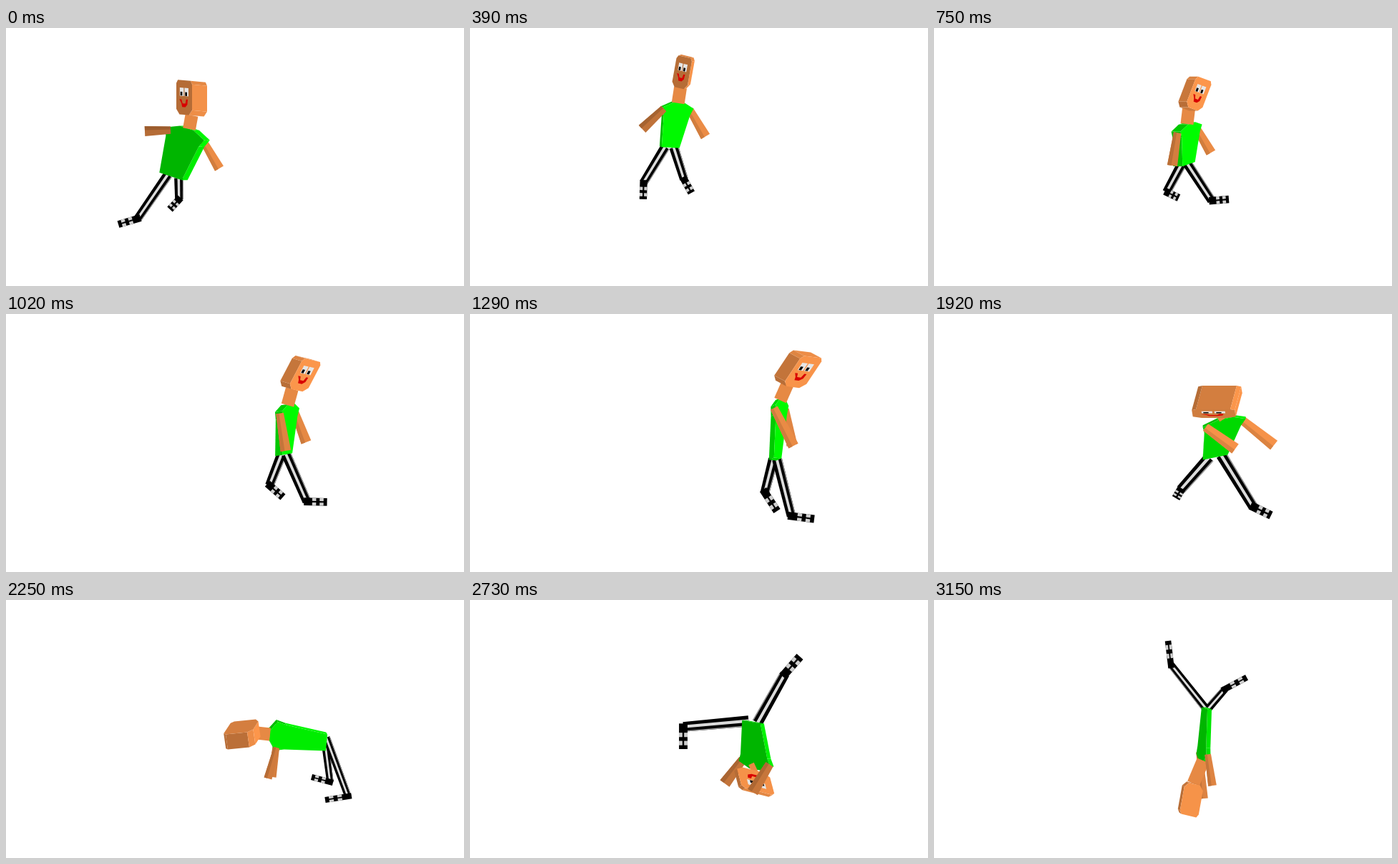
Recreate the animation shown at these times as an HTML page with a canvas. Size 640 by 360 pixels, loop 3180 ms.

```html
<!DOCTYPE html>
<html>
<head>
<meta charset="utf-8">
<style>
html, body { margin: 0; width: 100%; height: 100%; overflow: hidden; background: #fff; }
canvas { display: block; }
</style>
</head>
<body>
<canvas id="stage" width="640" height="360"></canvas>
<script>
const ctx = document.getElementById('stage').getContext('2d');
const LOOP = 3180, STEP = 30;
const SKIN = [255, 152, 76], GREEN = [0, 255, 0], GREY = [230, 230, 230], RED = [216, 0, 0];

// Key poses: joints on the stage, plus the half shoulder line, the chest depth
// and the three axes of the head (right, down, back) as projected vectors.
const poses = [
  { t: 0, girth: .92, hop: 32, neck: [252,141], hip: [230,207], shoulder: [27,9], depth: [8,0],
    handL: [194,144], handR: [298,196], ankleA: [184,266], toeA: [157,274], ankleB: [242,239], toeB: [229,253],
    head: [249,97], right: [11,1], down: [0,24], back: [21,2] },
  { t: 750, girth: .95, hop: 0, neck: [360,134], hip: [356,190], shoulder: [15,-5], depth: [-13,0],
    handL: [333,192], handR: [387,174], ankleA: [325,229], toeA: [342,237], ankleB: [388,241], toeB: [412,239],
    head: [370,92], right: [11,4], down: [-8,21], back: [-12,0] },
  { t: 1290, girth: 1, hop: 0, neck: [437,119], hip: [430,201], shoulder: [9,1], depth: [-7,3],
    handL: [452,184], handR: [450,183], ankleA: [412,249], toeA: [429,275], ankleB: [449,282], toeB: [481,286],
    head: [465,81], right: [15,2], down: [-14,21], back: [-15,-8] },
  { t: 1920, girth: 1.08, hop: 0, neck: [407,147], hip: [393,200], shoulder: [30,-6], depth: [0,-3],
    handL: [421,188], handR: [475,183], ankleA: [345,245], toeA: [338,257], ankleB: [446,269], toeB: [471,281],
    head: [391,139], right: [30,0], down: [1,6], back: [9,-33] },
  { t: 2250, girth: .75, hop: 0, neck: [370,189], hip: [448,199], shoulder: [2,-20], depth: [-2,-3],
    handL: [366,249], handR: [372,247], ankleA: [453,254], toeA: [427,247], ankleB: [478,274], toeB: [446,279],
    head: [332,198], right: [-6,9], down: [20,-2], back: [-3,-21] },
  { t: 2730, girth: 1.08, hop: 0, neck: [398,235], hip: [393,170], shoulder: [-22,-4], depth: [5,0],
    handL: [395,268], handR: [356,256], ankleA: [440,103], toeA: [461,79], ankleB: [298,177], toeB: [298,208],
    head: [399,252], right: [-23,-6], down: [-4,-15], back: [-4,3] },
  { t: 3150, girth: .78, hop: 0, neck: [373,224], hip: [378,151], shoulder: [-7,-2], depth: [6,0],
    handL: [389,259], handR: [377,277], ankleA: [407,124], toeA: [437,108], ankleB: [331,90], toeB: [327,57],
    head: [357,277], right: [13,3], down: [4,-22], back: [3,2] }
];

// Outlines in units of the two front axes.
const HEAD = [[-.8,-1], [.8,-1], [1,-.8], [1,.7], [.6,1], [-.6,1], [-1,.7], [-1,-.8]];
const SHIRT = [[-.35,-.02], [.35,-.02], [1,.1], [.85,.26], [.58,1], [-.58,1], [-.85,.26], [-1,.1]];

const mix = (a, b, u) => a + (b - a) * u;
const add = (p, v, k = 1) => [p[0] + v[0] * k, p[1] + v[1] * k];
const sub = (p, q) => add(p, q, -1);
const cross = (p, q) => p[0] * q[1] - p[1] * q[0];
const angleOf = v => Math.atan2(v[1], v[0]);
const lerp = (p, q, u) => add(p, sub(q, p), u);
const span = (o, a, b, [x, y]) => add(add(o, a, x), b, y);
function rotate([x, y], r) {
  const c = Math.cos(r), s = Math.sin(r);
  return [x * c - y * s, x * s + y * c];
}
function swing(p, q, u) {
  const from = angleOf(p), turn = angleOf(q) - from;
  const angle = from + Math.atan2(Math.sin(turn), Math.cos(turn)) * u;
  return rotate([mix(Math.hypot(...p), Math.hypot(...q), u), 0], angle);
}

// Where each limb hangs on the body.
const joints = {
  head: p => p.neck,
  handL: p => shoulderAt(p, -1), handR: p => shoulderAt(p, 1),
  ankleA: p => hipAt(p, -1), ankleB: p => hipAt(p, 1),
  toeA: p => p.ankleA, toeB: p => p.ankleB
};
const middle = (p, from) => add(from, p.depth, .5);
const shoulderAt = (p, side) => add(add(middle(p, p.neck), p.shoulder, side * .85), sub(p.hip, p.neck), .14);
const hipAt = (p, side) => add(middle(p, p.hip), p.shoulder, side * .28);

// Limbs swing and axes turn relative to the spine.
function blend(a, b, u) {
  const spineA = sub(a.hip, a.neck), spineB = sub(b.hip, b.neck), spine = swing(spineA, spineB, u);
  const ra = angleOf(spineA), rb = angleOf(spineB), r = angleOf(spine);
  const turned = (fn, v, w) => rotate(fn(rotate(v, -ra), rotate(w, -rb), u), r);
  const pose = { girth: mix(a.girth, b.girth, u) };
  pose.neck = add(lerp(a.neck, b.neck, u), [-a.hop / 2, -a.hop], Math.sin(Math.PI * u));
  pose.hip = add(pose.neck, spine);
  for (const axis of ['shoulder', 'depth', 'right', 'down', 'back'])
    pose[axis] = turned(lerp, a[axis], b[axis]);
  for (const name in joints) {
    const joint = joints[name];
    pose[name] = add(joint(pose), turned(swing, sub(a[name], joint(a)), sub(b[name], joint(b))));
  }
  return pose;
}

function poly(points, color, shade = 1) {
  ctx.fillStyle = `rgb(${color.map(c => Math.round(c * Math.min(shade, 1)))})`;
  ctx.beginPath();
  for (const p of points) ctx.lineTo(...p);
  ctx.fill();
}

// The light comes from the right.
const lit = v => .85 + .14 * v[0] / (Math.hypot(...v) || 1);

function prism(outline, front, a, b, c, color) {
  const facing = cross(a, b) > 0;
  const points = outline.map(p => span(front, a, b, p));
  points.forEach((p, i) => {
    const q = points[(i + 1) % points.length];
    if (cross(sub(q, p), c) < 0)
      poly([p, q, add(q, c), add(p, c)], color, lit(sub(lerp(p, q, .5), span(front, a, b, [0, .4]))));
  });
  poly(facing ? points : points.map(p => add(p, c)), color, lit(facing ? sub([0, 0], c) : c));
}

// A patch of a tapered limb; u runs along it, v across it.
function patch(from, to, w0, w1, color, shade = 1, [u0, u1] = [0, 1], [v0, v1] = [0, 1]) {
  const d = sub(to, from), len = Math.hypot(...d) || 1, n = [-d[1] / len, d[0] / len];
  const at = (u, v) => add(add(from, d, u), n, (v - .5) * mix(w0, w1, u));
  poly([at(u0, v0), at(u1, v0), at(u1, v1), at(u0, v1)], color, shade);
}

function drawArm(pose, side, hand) {
  const from = shoulderAt(pose, side), shade = lit(sub(hand, from));
  const w0 = 11 * pose.girth, w1 = 15 * pose.girth;
  patch(from, hand, w0, w1, SKIN, shade);
  patch(from, hand, w0, w1, SKIN, shade - .1, [0, 1], [.6, 1]);
}

function drawLeg(pose, side, ankle, toe) {
  const from = hipAt(pose, side), w = 14 * pose.girth, foot = 11 * pose.girth;
  patch(from, ankle, w, w * .9, GREY, 0);
  patch(from, ankle, w, w * .9, GREY, .95, [0, 1], [.38, .66]);
  patch(from, ankle, w, w * .9, GREY, .7, [0, 1], [0, .09]);
  const heel = lerp(ankle, toe, -.15);
  patch(heel, toe, foot, foot, GREY, 0);
  for (const u of [.36, .68])
    for (const v of [0, .6]) patch(heel, toe, foot, foot, GREY, .9, [u, u + .17], [v, v + .4]);
}

function drawFeatures({ head, right, down }) {
  if (cross(right, down) <= 0) return;
  const shape = (points, color, shade) => poly(points.map(p => span(head, right, down, p)), color, shade);
  const box = (l, t, w, h, color, shade) => shape([[l, t], [l + w, t], [l + w, t + h], [l, t + h]], color, shade);
  for (const x of [-.56, .04]) {
    box(x, -.56, .5, .48, GREY);
    box(x + .08, -.32, .24, .22, GREY, 0);
  }
  shape([[-.6,.12], [-.35,.12], [-.2,.35], [.15,.35], [.25,.1], [.45,.1], [.4,.4], [.15,.56], [-.25,.56], [-.35,.35]], RED);
}

function draw(time) {
  let i = 0;
  while (i < poses.length - 2 && time >= poses[i + 1].t) i++;
  const a = poses[i], b = poses[i + 1];
  const pose = blend(a, b, (time - a.t) / (b.t - a.t));
  ctx.fillStyle = '#fff';
  ctx.fillRect(0, 0, 640, 360);
  drawArm(pose, 1, pose.handR);
  drawLeg(pose, -1, pose.ankleA, pose.toeA);
  drawLeg(pose, 1, pose.ankleB, pose.toeB);
  prism(SHIRT, pose.neck, pose.shoulder, sub(pose.hip, pose.neck), pose.depth, GREEN);
  const chin = add(add(pose.head, pose.down), pose.back, .5);
  patch(middle(pose, pose.neck), chin, 18, 18, SKIN, .9);
  prism(HEAD, pose.head, pose.right, pose.down, pose.back, SKIN);
  drawFeatures(pose);
  drawArm(pose, -1, pose.handL);
}

const begin = performance.now();
function tick() {
  const time = (performance.now() - begin) % LOOP;
  draw(Math.floor(time / STEP) * STEP);
  requestAnimationFrame(tick);
}
tick();
</script>
</body>
</html>
```
